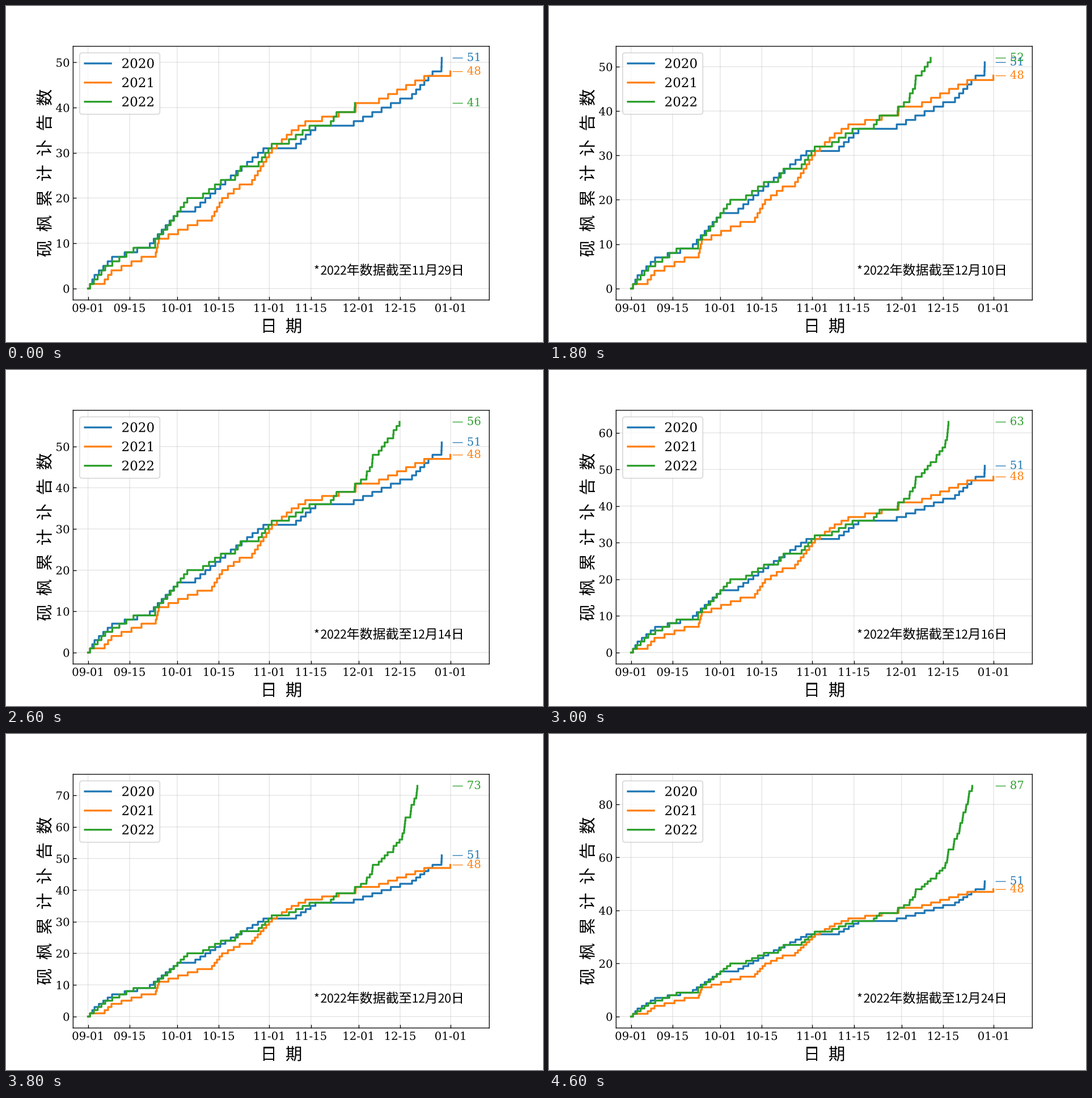
Animation of 947x592 px, one loop 6600 ms. Source, as a matplotlib script:

```python
import matplotlib.pyplot as plt
import numpy as np
from matplotlib import patheffects
from matplotlib.animation import FuncAnimation

W, H, DPI = 947, 592, 118.375
STEP_MS, FRAMES = 200, 33
CJK = "Noto Sans CJK JP"

# Outlined, unsnapped drawing keeps every edge at its sub-pixel place
plt.rcParams.update({
    "font.family": "DejaVu Serif",
    "font.size": 12,
    "text.hinting": "none",
    "path.snap": False,
    "path.effects": [patheffects.Normal()],
    "xtick.direction": "in",
    "ytick.direction": "in",
})

# Key points, count: days since 1 September; counts between are interpolated
KEYS = {
    "2020": {1: .7, 3: 2.2, 7: 8.1, 10: 20.8, 17: 30.1, 18: 36.1, 24: 46.2,
             31: 59, 32: 70, 36: 76.5, 37: 89.4, 42: 105, 43: 109, 48: 115.9,
             49: 118.9, 51: 119},
    "2021": {1: .7, 2: 5.6, 4: 7.9, 7: 18, 8: 22.8, 11: 23.8, 15: 36.8,
             16: 41.7, 20: 45.1, 23: 51, 24: 55.2, 31: 61.9, 35: 68.5,
             37: 73.1, 40: 90, 41: 90.1, 42: 97.9, 47: 113.1, 48: 121.9},
    "2022": {1: .7, 5: 5.8, 9: 15.3, 10: 22.6, 11: 22.6, 14: 26.7, 20: 33.4,
             21: 38.7, 24: 44.7, 25: 49.5, 27: 51.3, 28: 57.4, 32: 61.8,
             33: 67.6, 36: 74.5, 37: 81.7, 39: 83.6, 40: 89.7, 41: 89.8},
}
DEC_1 = 91
DECEMBER = "102130111102112504244352"  # new events on each day of December
SHOWN = [89, *range(92, 115)]  # last day covered by each step


def event_days(keys):
    counts = range(1, max(keys) + 1)
    return list(np.interp(counts, list(keys), list(keys.values())))


def evening_events(day, n):
    return [day + .8 - .12 * i for i in reversed(range(n))]


def steps(days):
    return [0, *days], range(len(days) + 1)


def note_text(day):
    month, date = (11, day - 60) if day < DEC_1 else (12, day - 90)
    return f"*2022年数据截至{month}月{date:02d}日"


DAYS = {year: event_days(keys) for year, keys in KEYS.items()}
for day, n in enumerate(DECEMBER, DEC_1):
    DAYS["2022"] += evening_events(day, int(n))

fig = plt.figure(figsize=(8, 5.0011), dpi=DPI, facecolor="white")
fig.subplots_adjust(left=.125, right=.9, top=.88, bottom=.125)
ax = fig.add_subplot()


def cells(x, y, s, size, vertical=False):
    """Set s on a grid: full-width ideographs, half-width ASCII."""
    em = size * DPI / 72
    out = []
    for ch in s:
        half = ord(ch) < 128
        out.append(fig.text(
            x / W, 1 - y / H, ch, family=CJK, size=size - half,
            ha="left", va="baseline", rotation=90 if vertical else 0,
            rotation_mode="anchor"))
        step = em / 2 if half else em
        if vertical:
            y -= step
        else:
            x += step
    return out


lines, labels = {}, {}
for i, (year, days) in enumerate(DAYS.items()):
    n = len(days)
    lines[year], = ax.plot(*steps(days), drawstyle="steps-post", lw=2,
                           color=f"C{i}", label=year)
    labels[year] = ax.text(122.5, n, f"— {n}", color=f"C{i}", va="center")

ax.set_xlim(-5, 135)
ax.set_xticks([0, 14, 30, 44, 61, 75, 91, 105, 122],
              ["09-01", "09-15", "10-01", "10-15", "11-01", "11-15",
               "12-01", "12-15", "01-01"])
ax.grid(alpha=.35)
ax.legend(loc="upper left", fontsize=14)

cells(448.4, 574.2, "日 期", 18)
cells(78.3, 442.5, "砚 枫 累 计 讣 告 数", 18, vertical=True)
note = cells(543, 473.3, note_text(SHOWN[0]), 14)


def update(k):
    last = SHOWN[min(k, len(SHOWN) - 1)]
    days = [d for d in DAYS["2022"] if d < last + 1]
    n = len(days)
    lines["2022"].set_data(*steps(days))
    labels["2022"].set_text(f"— {n}")
    labels["2022"].set_y(n)
    top = max(n, len(DAYS["2020"]))
    ax.set_ylim(-.05 * top, 1.05 * top)
    for cell, ch in zip(note, note_text(int(days[-1]))):
        cell.set_text(ch)
    return []


anim = FuncAnimation(fig, update, frames=FRAMES, interval=STEP_MS,
                     repeat=True, repeat_delay=0)
plt.show()
```
